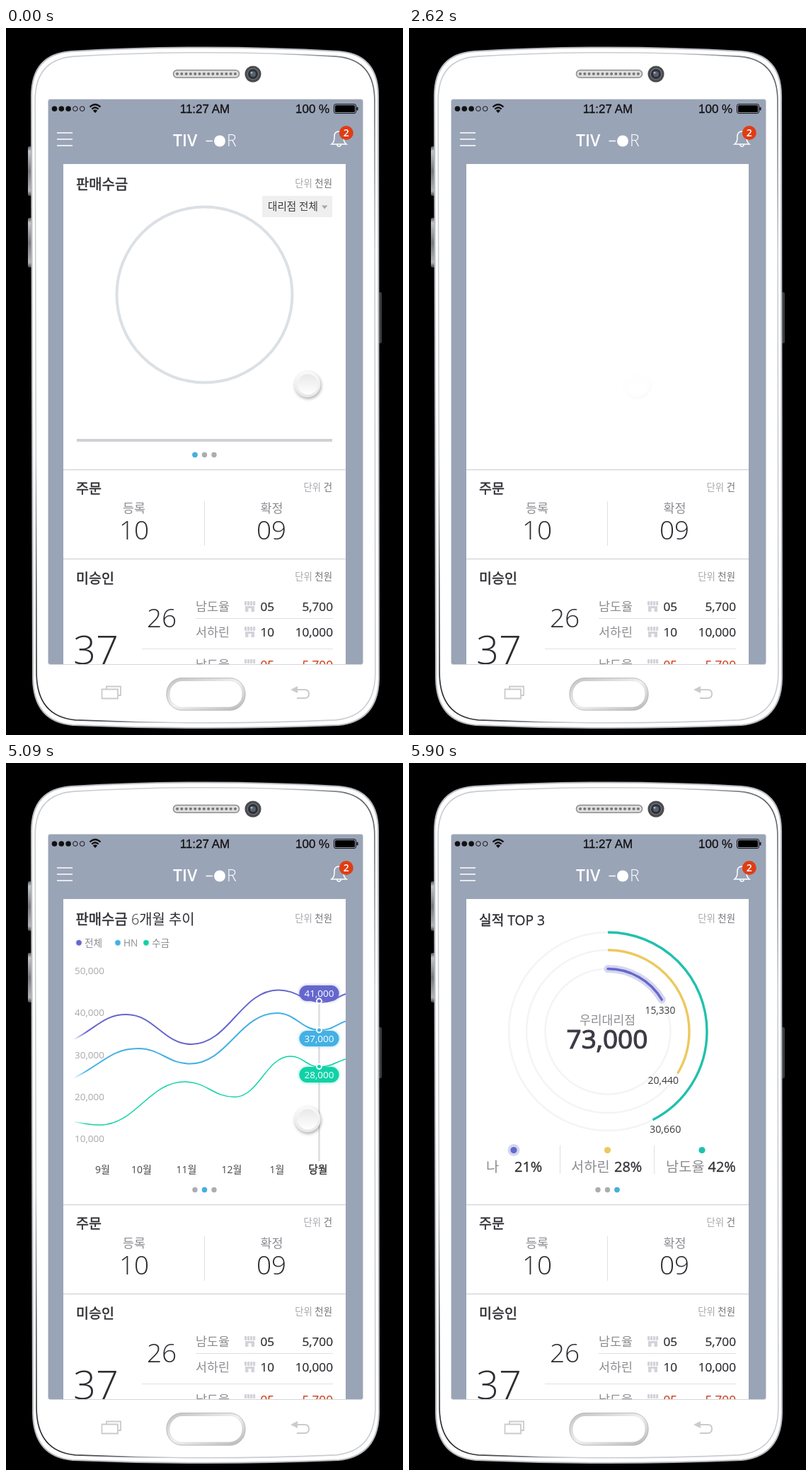
An HTML page that plays this animation: 561x998 px, repeating every 7.26 s.

```html
<!DOCTYPE html>
<html lang="ko">
<head>
<meta charset="utf-8">
<title>Sales dashboard</title>
<style>
html, body { margin: 0; width: 100%; height: 100%; overflow: hidden; background: #000; }
svg { display: block; width: 100%; height: 100%; }
text { fill: currentColor; font-family: "Open Sans", "Noto Sans", "Noto Sans CJK KR", "Noto Sans CJK", sans-serif; white-space: pre; }
.l { font-weight: 300; }
.m, .d, .h { font-weight: 500; stroke: currentColor; stroke-width: .014em; }
.d { stroke-width: .03em; }
.h { stroke-width: .024em; }
.b { font-weight: 600; }
.s { font-family: "Liberation Sans", Arial, sans-serif; stroke: currentColor; stroke-width: .3; }
.mid { text-anchor: middle; }
.end { text-anchor: end; }
</style>
</head>
<body>
<svg id="stage" viewBox="0 0 561 998" xmlns="http://www.w3.org/2000/svg"></svg>
<script>
const LOOP = 7260;
const BLUE = '#44b0e4', PURPLE = '#6567cd', GREEN = '#10d2a7', TEAL = '#21c1ad', YELLOW = '#ecc95f';
const INK = '#2d2d32', GREY = '#8c8c92', PALE = '#a8a8ad', RED = '#cf4320';
const NAMES = ['남도율', '서하린'];

// Markup helpers
const text = (x, y, size, str, cls = '', color = INK, id = '') =>
  `<text x="${x}" y="${y}" font-size="${size}" class="${cls}" style="color:${color}" ${id && `id="${id}"`}>${str}</text>`;
const rect = (x, y, w, h, fill, r = 0, more = '') =>
  `<rect x="${x}" y="${y}" width="${w}" height="${h}" rx="${r}" fill="${fill}" ${more}/>`;
const dot = (x, y, r, fill, more = '') => `<circle cx="${x}" cy="${y}" r="${r}" fill="${fill}" ${more}/>`;
const path = (d, stroke, w, more = '') =>
  `<path d="${d}" fill="none" stroke="${stroke}" stroke-width="${w}" ${more}/>`;
const ring = (x, y, r, w, stroke, more = '') => dot(x, y, r, 'none', `stroke="${stroke}" stroke-width="${w}" ${more}`);
const arc = (x, y, r, w, stroke, id, more = '') =>
  ring(x, y, r, w, stroke, `class="${id}" pathLength="360" stroke-dasharray="0 400" transform="rotate(-90 ${x} ${y})" ${more}`);
const group = (id, body, more = '') => `<g id="${id}" ${more}>${body}</g>`;
const glow = (color, r = 2) => `style="filter:drop-shadow(0 0 ${r}px ${color})"`;
const gradient = (id, stops, more = '') => `<linearGradient id="${id}" ${more}>${stops.map(([o, c, a = 1]) =>
  `<stop offset="${o}" stop-color="${c}" stop-opacity="${a}"/>`).join('')}</linearGradient>`;
const unit = (y, what) => text(461, y, 13.4, `단위 <tspan fill="#74747a">${what}</tspan>`, 'end', PALE);

// Smooth curve: inner points are peaks and troughs, both ends are sloped
function wave(points) {
  let d = `M${points[0]}`;
  for (let i = 1; i < points.length; i++) {
    const [x0, y0] = points[i - 1], [x1, y1] = points[i], dx = x1 - x0, dy = y1 - y0;
    const lean0 = i === 1 ? .45 * dy : 0, lean1 = i === points.length - 1 ? .45 * dy : 0;
    d += `C${x0 + .43 * dx} ${y0 + lean0} ${x1 - .43 * dx} ${y1 - lean1} ${x1} ${y1}`;
  }
  return d;
}

const defs = `<defs>
  ${gradient('rim', [[0, '#111'], [.1, '#55585d'], [.2, '#c9ccd0'], [.85, '#c9ccd0'], [1, '#4a4d52']], 'x1="0" y1="1" x2="1" y2="0"')}
  ${gradient('key', [[0, '#55575a'], [.1, '#c2c4c6'], [.5, '#77797c'], [.9, '#b2b4b6'], [1, '#444']], 'x2="0" y2="1"')}
  ${gradient('home', [[0, '#c3c3c5'], [.5, '#f0f0f1'], [1, '#b9b9bb']], 'y2="1"')}
  ${gradient('bar', [[0, '#45aee6'], [1, '#22e5dc']])}
  ${gradient('knob', [[0, '#e8e8e8'], [1, '#fff']], 'x2="0" y2="1"')}
  ${gradient('knobEdge', [[0, '#fafafa'], [1, '#e6e6e6']], 'x2="0" y2="1"')}
  ${[PURPLE, BLUE, GREEN].map((c, i) => gradient('line' + i, [[0, c, 0], [.05, c], [1, c]],
    'gradientUnits="userSpaceOnUse" x1="95" x2="480" y1="0" y2="0"')).join('')}
  <clipPath id="card">${rect(81, 192, 399, 706, '#000')}</clipPath>
</defs>`;

function phone() {
  const body = 'M36 96Q36 37 92 33Q281 22 470 33Q526 37 526 96L527 918Q526 978 470 984Q281 992 94 984Q39 979 38 918Z';
  let out = rect(31, 167, 7, 70, 'url(#key)', 2) + rect(31, 268, 7, 70, 'url(#key)', 2) + rect(525, 373, 6, 72, '#3c3d40', 2);
  out += `<path d="${body}" fill="#fff" stroke="#b9bcc0" stroke-width="2"/>`;
  out += path(body, 'url(#rim)', 1.6, 'transform="translate(281 507) scale(.979 .985) translate(-281 -507)"');
  out += rect(236.5, 59.5, 93, 10.5, '#dedede', 5, 'stroke="#8b8b8d" stroke-width="1.5"');
  for (let i = 0; i < 14; i++) out += dot(242 + i * 6.3, 64.8, 2, '#77777a');
  out += dot(349, 65, 11.5, '#4a4b4e') + dot(349, 65, 8.5, '#6a6e73') + dot(349, 65, 7, '#2c3036') + dot(349, 65, 4, '#56616d') + dot(347, 63, 1.6, '#a4b0bc');
  out += rect(59.5, 100.5, 445, 798, '#9aa4b7', 3, 'stroke="#d3d6da"');
  out += path('M142 933V929.5H162V942H158.5M135.5 933.5H158V946.5H135.5Z', '#cbcbcd', 1.8);
  out += rect(229, 919.5, 107, 41.5, '#fff', 20, 'stroke="url(#home)" stroke-width="5"');
  out += rect(227, 917.5, 111, 45.5, 'none', 22, 'stroke="#b6b6b8" stroke-width=".8"');
  out += path('M410 934H422Q428 934 428 940T422 946H411', '#cbcbcd', 2) + '<path d="M402 934L412 929V939Z" fill="#cbcbcd"/>';
  return out;
}

function header() {
  let out = '';
  for (let i = 0; i < 5; i++) {
    out += i < 3 ? dot(68.5 + i * 9.8, 114, 3.8, '#111') : ring(68.5 + i * 9.8, 114, 3.3, 1, '#111');
  }
  out += path('M118.5 111.5Q126 104.5 133.5 111.5M121.3 114.5Q126 110 130.7 114.5', '#111', 2.2);
  out += '<path d="M126 120L122.8 116.5Q126 114 129.2 116.5Z" fill="#111"/>';
  out += text(281, 120, 17, '11:27 AM', 's mid', '#111') + text(409, 120, 17, '100 %', 's', '#111');
  out += rect(463.5, 107.5, 31, 13, 'none', 2.5, 'stroke="#111"') + rect(465, 109, 28, 10, '#000', 1.5) + rect(495.5, 111.5, 2, 5, '#111', 1);
  out += path('M72 148H94M72 157H94M72 166H94', '#fff', 1.6);
  out += text(236, 167, 23, 'TIV', 'b', '#fff') + path('M282.5 159.5H292', '#fff', 1.5) + dot(302, 159.5, 8, '#fff') + text(312, 167, 23, 'R', 'l', '#fff');
  out += path('M460 164H481Q477 161 477 155V153Q477 146 470.5 146T464 153V155Q464 161 460 164ZM467.5 165Q470.5 169.5 473.5 165', '#fff', 1.5);
  out += dot(480.8, 148, 10, '#e03d14') + text(480.8, 153, 14, '2', 'b mid', '#fff');
  return out;
}

function lists() {
  const shop = y => [0, 1, 2, 3].map(i => rect(337 + i * 4, y - 14, 3.2, 6, '#d3d3da', .8)).join('') +
    rect(338, y - 7, 4.5, 8, '#d3d3da') + rect(346.5, y - 7, 4.5, 8, '#d3d3da') + rect(338, y - 7, 13, 3, '#d3d3da');
  const row = (y, name, count, sum, color) => text(268, y, 17.4, name, 'l', GREY) + shop(y) +
    text(359.5, y, 17.2, count, 'm', color) + text(462, y, 17.2, sum, 'm end', color);
  return path('M81 623.5H480M81 749.5H480', '#d8d8dc', 1.3) +
    text(99, 657, 19.6, '주문', 'h') + unit(653, '건') +
    text(181, 683.5, 17.4, '등록', 'l mid', GREY) + text(375.5, 683.5, 17.4, '확정', 'l mid', GREY) +
    text(181, 722, 37, '10', 'l mid') + text(375, 722, 37, '09', 'l mid') + path('M280.5 668V731', '#e0e0e3', 1) +
    text(99, 784, 19.6, '미승인', 'h') + unit(779, '천원') +
    text(95, 898, 56, '37', 'l') + text(199, 846, 37, '26', 'l') +
    row(823, NAMES[0], '05', '5,700', INK) + row(859, NAMES[1], '10', '10,000', INK) + row(905, NAMES[0], '05', '5,700', RED) +
    path('M268 833.5H462M192 876.5H462', '#e0e0e3', 1);
}

function salesCard() {
  return text(99, 228, 19.9, '판매수금', 'h') + unit(224, '천원') +
    ring(280.5, 376.5, 124, 4, '#dbe0e4') +
    rect(362, 237, 99, 30, '#efeff0') + text(370, 257, 14.6, '대리점 전체', '', '#3c3c40') +
    '<path d="M446 250.5H454.5L450.2 255.5Z" fill="#a8a8ac"/>' +
    arc(280.5, 376.5, 124, 4, BLUE, 'sweep', glow('#44b0e488')) +
    group('totals',
      text(281, 365, 17, '하늘마루상사', 'l mid', '#96969b') +
      `<text x="239" y="407" font-size="43" style="color:${INK}"><tspan id="rate" class="d"></tspan><tspan class="l" dx="2">%</tspan></text>` +
      text(280.5, 544, 36.8, '', 'm mid', INK, 'total')) +
    group('parts',
      text(100, 568, 18.8, '수금 <tspan id="paid" class="m" font-size="19.8"></tspan>') +
      text(461.5, 569, 18.8, '미수 <tspan id="due" class="m" font-size="19.8"></tspan>', 'end', RED)) +
    rect(100, 580, 361, 4, '#d0d1d4') + rect(100, 580, 0, 4, 'url(#bar)', 0, `id="fill" ${glow('#36c8e288', 1.5)}`);
}

const trendLines = [
  [[96, 390], [170, 355], [262, 397], [385, 320.5], [447, 337.5], [480, 326]],
  [[96, 444.5], [187, 403], [260, 424.5], [383, 353], [444, 377], [480, 364.5]],
  [[96, 506.5], [132, 511], [253, 450], [323, 471.5], [402, 414], [443, 429], [480, 418]]
].map((p, i) => path(wave(p), `url(#line${i})`, i === 2 ? 1.5 : 2)).join('');

function trendLabels() {
  let out = text(98.5, 228, 19.9, '<tspan class="h">판매수금</tspan> <tspan class="l">6개월 추이</tspan>') + unit(224, '천원');
  [[103, PURPLE, '전체'], [158, BLUE, 'HN'], [198, GREEN, '수금']].forEach(([x, c, s]) =>
    out += dot(x, 253.8, 3.7, c, glow(c + '66', 1.5)) + text(x + 8, 258.5, 13.7, s, '', GREY));
  for (let i = 0; i < 5; i++) out += text(97, 298 + i * 59.3, 13.5, `${5 - i}0,000`, '', PALE);
  [136.5, 191.5, 255, 319, 383].forEach((x, i) => out += text(x, 578.5, 14, `${(i + 8) % 12 + 1}월`, 'mid', '#48484c'));
  return out + text(441, 578.5, 14.6, '당월', 'h mid');
}

const trendPills = path('M442.5 336V562', '#dddde1', 2.5) +
  [[325, 336, PURPLE, '41,000'], [389, 377, BLUE, '37,000'], [440, 428.5, GREEN, '28,000']].map(([y, dotY, c, s]) =>
    rect(414.5, y - 11, 56, 22, c, 11, glow(c + '99')) + text(442.5, y + 4.8, 13.5, s, 'mid', '#fff') +
    dot(442.5, dotY, 4.4, '#fff') + dot(442.5, dotY, 2.5, c)).join('');

const rankArcs = [[140, TEAL, 153], [115, YELLOW, 121], [88.5, PURPLE, 59.5]];

function rankCard() {
  let out = text(99, 228.5, 19.2, '<tspan class="h">실적</tspan> <tspan class="m">TOP 3</tspan>') + unit(224, '천원');
  rankArcs.forEach(([r]) => out += ring(281, 379, r, 2.5, '#f4f4f6'));
  out += text(333.5, 353.5, 13.8, '15,330', '', '#3c3c40') + text(337.5, 452.5, 14, '20,440', '', '#3c3c40') + text(340, 522, 14.3, '30,660', '', '#3c3c40');
  out += text(280.5, 369, 17.2, '우리대리점', 'l mid', GREY) + text(280, 403, 37, '73,000', 'd mid', '#3b3b45');
  out += dot(148, 546.5, 8.5, '#d5d6ee');
  [[148, PURPLE, 109, '나', 149, 21], [280.5, YELLOW, 229, NAMES[1], 290, 28], [414, TEAL, 363, NAMES[0], 422.5, 42]]
    .forEach(([x, c, nameX, name, rateX, rate]) =>
      out += dot(x, 546.5, 4.6, c) + text(nameX, 577, 19.8, name, 'l', GREY) + text(rateX, 577, 20, rate + '%', 'm'));
  return out + path('M213.5 540V580M346.5 540V580', '#e0e0e3', 1);
}

const pagerX = [267, 280.5, 294];

const stage = document.getElementById('stage');
stage.innerHTML = defs + phone() + header() + rect(81, 192, 399, 706, '#fff') +
  group('cards', lists() +
    group('sales', salesCard()) +
    group('lines', trendLines) + group('labels', trendLabels() + trendPills) +
    group('rank', rankCard()) +
    group('arcs', arc(281, 379, 88.5, 11, '#d5d6ee', 'rank2', 'stroke-linecap="round"') +
      rankArcs.map(([r, c], i) => arc(281, 379, r, 3.4, c, 'rank' + i, i === 2 ? 'stroke-linecap="round"' : '')).join('')) +
    group('pager', pagerX.map((x, i) => dot(x, 602.5, 3.7, '#acacb1') + dot(x, 602.5, 3.7, BLUE, `id="page${i}"`)).join('')) +
    group('knobBox', dot(0, 0, 18.5, 'url(#knobEdge)', 'style="filter:drop-shadow(1px 2px 2px #0005)"') + dot(.5, 0, 14.5, 'url(#knob)')),
    'clip-path="url(#card)"');

const el = id => document.getElementById(id);
const span = (t, a, b) => Math.min(1, Math.max(0, (t - a) / (b - a)));
const ease = u => u * u * (3 - 2 * u);
const easeOut = u => 1 - (1 - u) ** 3;
const count = n => Math.round(n).toLocaleString('en-US');
const place = (id, x, alpha, y = 0) => {
  el(id).setAttribute('transform', `translate(${x} ${y})`);
  el(id).setAttribute('opacity', alpha);
};
const sweep = (cls, deg) => document.querySelectorAll('.' + cls).forEach(c => c.setAttribute('stroke-dasharray', `${deg} 400`));

function draw(t) {
  // Card one: ring, counters and bar
  const turn = ease(span(t, 90, 810)), fill = easeOut(span(t, 90, 1110)), sums = easeOut(span(t, 450, 1110));
  sweep('sweep', 310 * turn);
  el('rate').textContent = count(79 * turn);
  el('total').textContent = count(37000 * turn);
  el('paid').textContent = count(3000 * sums);
  el('due').textContent = count(200 * sums);
  el('totals').setAttribute('opacity', span(t, 90, 300));
  el('parts').setAttribute('opacity', span(t, 450, 750));
  el('fill').setAttribute('width', 272 * fill);

  // Swipes between cards
  const drag1 = span(t, 2260, 2620), drag2 = span(t, 5090, 5670);
  const out1 = ease(drag1), out2 = ease(drag2);
  const in2 = ease(span(t, 3400, 3760)), in3 = ease(span(t, 5305, 5810));
  const x2 = 66 * (1 - in2) - 86 * out2, x3 = 66 * (1 - in3);
  place('sales', -86 * out1, 1 - out1);
  place('lines', 0, span(t, 3070, 3760) ** 4 * (1 - out2));
  place('labels', x2, Math.sqrt(in2) * (1 - out2) ** .7);
  place('rank', x3, in3);
  place('arcs', x3, span(t, 5090, 5200));
  rankArcs.forEach(([, , deg], i) => sweep('rank' + i, deg * easeOut(span(t, 5120, 5440))));

  const first = t < 3000;
  place('pager', 0, first ? 1 - out1 : Math.sqrt(Math.max(in2 * (1 - out2), in3)));
  [first ? 1 : 0, first ? 0 : 1 - out2, in3].forEach((a, i) => el('page' + i).setAttribute('opacity', a));

  // Touch knob
  const back = span(t, 3530, 3760);
  const alpha = first ? 1 - .92 * drag1 ** 2 : t < 5000 ? .08 + .92 * back : 1 - drag2 ** 2;
  place('knobBox', 426 - 104 * (out1 - ease(back) + out2), alpha, 503);
}

function tick() {
  draw(performance.now() % LOOP);
  requestAnimationFrame(tick);
}
tick();
</script>
</body>
</html>
```
